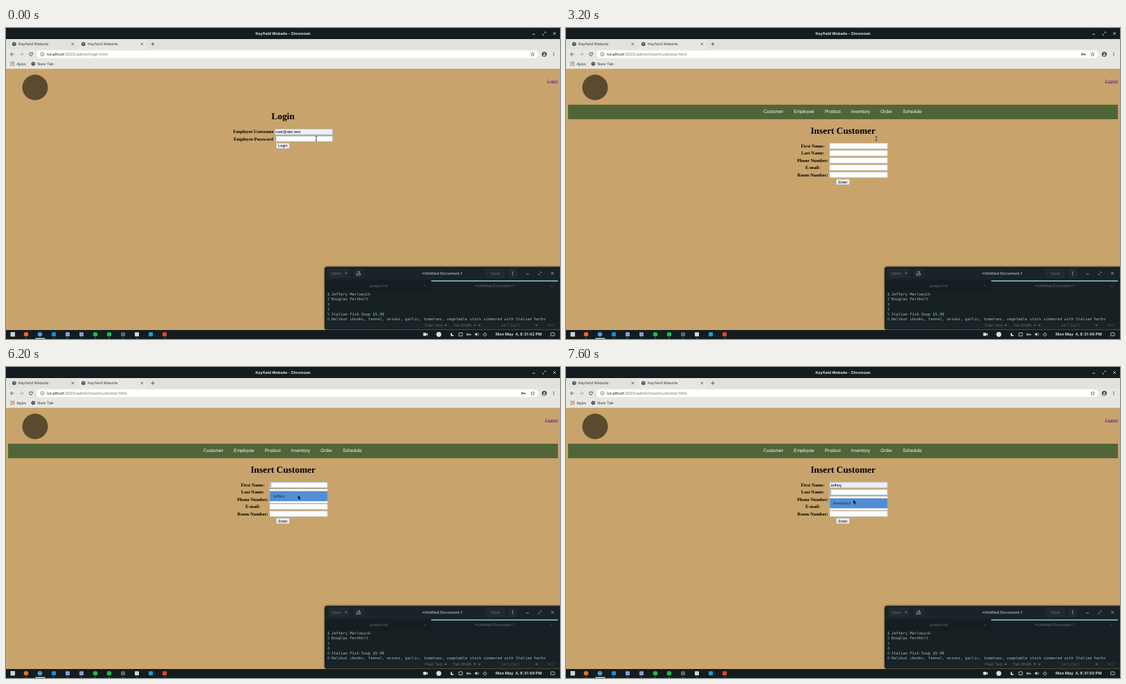
An HTML page with a canvas that plays this animation: 800x450 px, repeating every 8000 ms.

```html
<!DOCTYPE html>
<html>
<head>
<meta charset="utf-8">
<style>
html, body { margin: 0; width: 100%; height: 100%; overflow: hidden; background: #141c1f }
canvas { display: block }
</style>
</head>
<body>
<canvas id="stage" width="800" height="450"></canvas>
<script>
const c = document.getElementById('stage').getContext('2d');
c.textRendering = 'geometricPrecision';
const UI = 'Inter, sans-serif', SERIF = '"Liberation Serif", serif';
const SANS = '"Liberation Sans", sans-serif', MONO = '"DejaVu Sans Mono", monospace';
const TAN = '#c8a46c', DARK = '#141c1f', INK = '#3c4043', DIM = '#5f7378', TRAY = '#d5dddf';
const STRIP = '#e2e2dd', TOOLBAR = '#e7e7e2';
const FIRST = 'Jeffery', LAST = 'Marlowick', SITE = 'Keyfield Website';

function rect(x, y, w, h, color, radius = 0) {
  c.fillStyle = color;
  c.beginPath();
  c.roundRect(x, y, w, h, radius);
  c.fill();
}
function frame(x, y, w, h, color, width = .8, radius = 0) {
  c.strokeStyle = color;
  c.lineWidth = width;
  c.beginPath();
  c.roundRect(x, y, w, h, radius);
  c.stroke();
}
function disc(x, y, r, color) {
  c.fillStyle = color;
  c.beginPath();
  c.arc(x, y, r, 0, 7);
  c.fill();
}
function ring(x, y, r, color, width = .8, from = 0, to = 7) {
  c.strokeStyle = color;
  c.lineWidth = width;
  c.beginPath();
  c.arc(x, y, r, from, to);
  c.stroke();
}
function path(d, color, x = 0, y = 0, width = .8, fill = false) {
  const p = new Path2D(d);
  c.save();
  c.translate(x, y);
  c.lineWidth = width;
  c.strokeStyle = c.fillStyle = color;
  fill ? c.fill(p) : c.stroke(p);
  c.restore();
}
function text(s, x, y, size, family, color, align = 'left', style = '') {
  c.font = `${style} ${size}px ${family}`;
  c.textAlign = align;
  c.fillStyle = color;
  c.fillText(s, x, y);
  return c.measureText(s).width;
}
const heading = (s, y) => text(s, 400, y, 13.33, SERIF, '#000', 'center', 'bold');
const label = (s, x, y) => text(s, x, y, 6.67, SERIF, '#000', 'center', 'bold');
const caret = (x, y) => rect(x, y, .6, 6.4, '#222');
const cross = (x, y, color, r = 1.8) => path(`M${-r} ${-r}L${r} ${r}M${r} ${-r}L${-r} ${r}`, color, x, y);
const chevron = (x, y) => path('M-2-1H2L0 1.5Z', DIM, x, y, 1, true);

function windowButtons(x, y, gap, color) {
  path('M-2 1H2', color, x, y);
  path('M.3-2H2V-.3M-2 .3V2H-.3', color, x + gap, y);
  cross(x + 2 * gap, y, color);
}
function dots(x, y, color) {
  for (const d of [-2, 0, 2]) disc(x, y + d, .65, color);
}
function globe(x, y) {
  disc(x, y, 2.8, INK);
  path('M-2-1Q0-1 0 .5T1 2M.5-2Q0-.5 2 0', '#cfd2d5', x, y, .7);
}
function keyIcon(x, y, color) {
  ring(x - 1.4, y, 1.3, color, 1);
  path('M0 0H3V1.4M1.7 0V1.2', color, x, y, 1);
}
function link(s, style = '') {
  const w = text(s, 797, 78.7, 6.67, SERIF, '#551a8b', 'right', style);
  rect(797 - w, 79.5, w, .5, '#551a8b');
}
function field(x, y, { value = '', filled = false, focus = false } = {}) {
  rect(x, y, 84, 8.7, filled ? '#e8f0fe' : '#fff');
  frame(x + .3, y + .3, 83.4, 8.1, focus ? '#86a5cb' : '#a9a49c', focus ? .8 : .6);
  text(value, x + 1.3, y + 6.4, 5.55, SANS, '#000');
}
function button(s, y) {
  rect(390, y, 19.6, 8.4, '#efefef', .8);
  frame(390.2, y + .2, 19.2, 8, '#8a8a8a', .5, .8);
  text(s, 399.8, y + 6.1, 5.55, SANS, '#000', 'center');
}
function suggestion(y, name, hover) {
  rect(380.6, y, 84, 20.5, '#fff');
  if (hover) rect(380.6, y + 3, 84, 14.6, '#528ed6');
  text(name, 385.6, y + 11.9, 5.8, SANS, '#26323e');
  frame(380.6, y, 84, 20.5, '#a9a49c', .5);
}

function browser(url, hasKey) {
  rect(0, 0, 800, 16, DARK);
  text(SITE + ' - Chromium', 400, 10, 5.55, UI, '#dce4e6', 'center', 'bold');
  windowButtons(762, 8, 15, TRAY);
  rect(0, 16, 800, 15, STRIP);
  rect(103, 17.5, 100, 14, TOOLBAR, [3, 3, 0, 0]);
  for (const x of [0, 100]) {
    globe(11.8 + x, 23.3);
    text(SITE, 18 + x, 25.3, 5.5, UI, INK);
    cross(96.3 + x, 23.3, INK, 1.6);
  }
  path('M-2.6 0H2.6M0-2.6V2.6', INK, 212, 23.3);
  rect(0, 31, 800, 28, TOOLBAR);
  rect(44, 32.5, 725, 11, '#fff', 5.5);
  path('M2.7 0H-2.4M0-2.6L-2.6 0L0 2.6', INK, 9, 38);
  path('M-2.7 0H2.4M0-2.6L2.6 0L0 2.6', '#9fa2a4', 22.5, 38);
  ring(36, 38, 2.3, INK, .9, .3, 5.4);
  path('M2.8-3V-.5H.3Z', INK, 36, 38, 1, true);
  ring(52.5, 38, 2.5, INK, .6);
  rect(52.2, 37.6, .6, 1.9, INK);
  rect(52.2, 36.4, .6, .7, INK);
  const w = text('localhost:', 59, 40, 5.75, UI, '#202124');
  text('3003/admin/' + url, 59 + w, 40, 5.75, UI, '#70757a');
  if (hasKey) keyIcon(747, 38, INK);
  path('M0-2.8L.8-.9L2.8-.8L1.2 .6L1.8 2.6L0 1.5L-1.8 2.6L-1.2 .6L-2.8-.8L-.8-.9Z', INK, 760.5, 38, .6);
  disc(777.3, 38, 3.5, INK);
  disc(777.3, 37, 1.1, '#fff');
  rect(775.3, 38.8, 4, 1.4, '#fff', .7);
  dots(791, 38, INK);
  for (let i = 0; i < 9; i++)
    rect(6.3 + i % 3 * 2.2, 49 + Math.floor(i / 3) * 2.2, 1.4, 1.4, ['#db4437', '#4285f4', '#0f9d58', '#f4b400'][i % 4]);
  text('Apps', 15.2, 53.8, 5.65, UI, INK);
  globe(39.3, 51.7);
  text('New Tab', 45.3, 53.8, 5.65, UI, INK);
  rect(0, 59, 800, 379, TAN);
  disc(42, 86, 18.5, '#5a4a2f');
}

function loginPage(t) {
  const typed = [600, 1200, 1600, 1600, 2000, 2000, 2200, 2200].filter(k => t >= k).length;
  link('Login');
  heading('Login', 132.3);
  label('Employee Username', 357.3, 152.3);
  label('Employee Password', 357.3, 162.6);
  field(388, 145.9, { value: 'user@abc.test', filled: true });
  field(388, 156, { focus: true });
  for (let i = 0; i < typed; i++) disc(390.3 + i * 1.95, 160.3, .8, '#111');
  if (t < 200 || t >= 600) caret(389.2 + typed * 1.95, 157.1);
  button('Login', 166.3);
}

function customerPage(t) {
  link('Logout', 'italic');
  rect(3, 111, 794, 21, '#506538');
  let x = 285;
  for (const s of ['Customer', 'Employee', 'Product', 'Inventory', 'Order', 'Schedule'])
    x += text(s, x, 122.9, 6.67, SANS, '#fff') + 15.1;
  heading('Insert Customer', 153);
  const chosen = t >= 6400, second = t >= 7200;
  ['First Name:', 'Last Name:', 'Phone Number:', 'E-mail:', 'Room Number:'].forEach((s, i) => {
    const y = 166.4 + i * 10.42;
    label(s, 356.4, y + 6.5);
    field(380.5, y, {
      value: i == 0 && chosen ? FIRST : '',
      filled: i == 0 && chosen,
      focus: i == 0 ? t >= 6000 && !second : i == 1 && second
    });
  });
  button('Enter', 218.5);
  if (t >= 6000 && !chosen) {
    caret(381.8, 167.4);
    suggestion(176.6, FIRST, t >= 6200);
  }
  if (second) caret(381.8, 177.9);
  if (t >= 7400) suggestion(187, LAST, t >= 7600);
}

function editor() {
  c.save();
  c.shadowColor = 'rgba(0, 0, 0, .6)';
  c.shadowBlur = 3;
  rect(460, 345.6, 345, 91, '#1a2327', [4, 4, 0, 3]);
  c.restore();
  for (const [x, w] of [[466, 30], [502, 14.5], [692, 29], [725, 13]]) rect(x, 348, w, 14, '#202b2f', 2);
  text('Open', 470, 357, 5.55, UI, DIM);
  chevron(491, 355);
  path('M-2.5 2.5V0H2.5V2.5ZM-1.5-2.5H1.5V0', '#9db0b4', 509, 355);
  text('*Untitled Document 1', 629.5, 357, 5.55, UI, '#8fa6ab', 'center', 'bold');
  text('Save', 706.5, 357, 5.55, UI, DIM, 'center');
  dots(731.5, 355, '#a9bbbf');
  windowButtons(753, 355, 18, '#9db0b4');
  rect(460, 364.5, 340, 16.5, '#172024');
  rect(462, 365, 152, 16, '#151d20');
  rect(614, 365.2, 183, 1.6, '#8ccfd3');
  text('project.txt', 538.5, 375.2, 5.55, UI, DIM, 'center');
  text('*Untitled Document 1', 705.5, 375.2, 5.55, UI, DIM, 'center');
  cross(605.5, 373.3, '#3d4c51', 1.4);
  cross(788, 373.3, '#3d4c51', 1.4);
  rect(460, 381, 340, 44.5, '#172023');
  [FIRST + ' ' + LAST, 'Douglas Fernholt', '', '', 'Italian Fish Soup $5.99',
    'Halibut chunks, fennel, onions, garlic, tomatoes, vegetable stock simmered with Italian herbs'
  ].forEach((s, i) => {
    const y = 387.3 + i * 7.1;
    text(i + 1, 467.3, y, 5.54, MONO, i ? '#83a0a4' : '#c5d5d7', 'right');
    text(s, 469.8, y, 5.54, MONO, '#9fbcbf');
  });
  text('Plain Text', 605, 432.2, 5.55, UI, DIM);
  text('Tab Width: 8', 645.5, 432.2, 5.55, UI, DIM);
  text('Ln 1, Col 1', 715.5, 432.2, 5.55, UI, DIM);
  text('INS', 782, 432.2, 5.55, UI, '#43545a');
  for (const x of [635, 683.5, 766]) chevron(x, 430.3);
}

function taskbar(t) {
  rect(0, 437, 800, 13, DARK);
  rect(42.5, 448.6, 14, 1.4, '#c3d8e0');
  rect(6.5, 440, 6.5, 6.5, '#c9d6d8');
  ['#e8692c', '#5b8fd8', '#1f8ad2', '#7f9fd6', '#8a9bd0', '#1db954', '#1db954', '#4d6a78', '#d5d8d6', '#1b9ad6', '#e0452c']
    .forEach((color, i) => {
      const x = 29 + i * 20;
      if ([0, 1, 5, 6].includes(i)) disc(x, 443.3, 3.3, color);
      else rect(x - 3, 440.3, 6, 6, color, .8);
      if (i != 1 && i != 9) rect(x - .7, 448.8, 1.4, 1, '#82979b');
    });
  rect(602.5, 441, 4.5, 4.6, TRAY, .6);
  path('M0 0L2.5-2V2Z', TRAY, 606.5, 443.3, 1, true);
  disc(625, 443.3, 3.6, TRAY);
  disc(644.5, 443.3, 2.6, TRAY);
  disc(646, 442.4, 2.2, DARK);
  frame(654, 441, 5, 4.6, TRAY);
  keyIcon(668, 443.3, TRAY);
  path('M-3-1H-1.5L.3-2.7V2.7L-1.5 1H-3Z', TRAY, 680, 443.3, 1, true);
  ring(680, 443.3, 2.5, TRAY, .7, -.9, .9);
  ring(691.5, 443.5, 2.2, TRAY, .8, -.9, 4.04);
  rect(691.1, 440.4, .8, 2.6, TRAY);
  const seconds = 43 + Math.floor((t - 200) / 1000);
  text(`Mon May  4, 8:31:${seconds} PM`, 707, 445.3, 5.75, UI, '#e3eaec', 'left', '600');
  frame(786.7, 441, 5.4, 4.4, TRAY, .8, .5);
}

const route = [
  [0, 448, 160], [4000, 448, 160], [5200, 459, 235], [5400, 440, 160], [5600, 425.5, 170],
  [5800, 425.5, 170], [6200, 421.7, 185.5], [6400, 421.7, 185.5], [7000, 421, 182],
  [7200, 421, 182], [7600, 415, 192], [8000, 415, 192]
];
function pointer(t) {
  const i = route.findIndex(p => p[0] > t);
  const [t0, x0, y0] = route[i - 1], [t1, x1, y1] = route[i];
  const k = (t - t0) / (t1 - t0), x = x0 + (x1 - x0) * k, y = y0 + (y1 - y0) * k;
  if (t == 6200 || t >= 7600) path('M0 0V6L1.4 4.7L2.3 6.8L3.2 6.4L2.3 4.4H4.2Z', '#111', x, y, 1, true);
  else path('M-1.4-3H1.4M0-3V3M-1.4 3H1.4', '#33302a', x, y, .8);
}

function draw(now) {
  const t = Math.floor(now % 8000 / 200) * 200;
  browser(t < 3000 ? 'login.html' : 'insertcustomer.html', t >= 600 && t < 6600);
  if (t < 3200) loginPage(t);
  else customerPage(t);
  // screen tearing while the next page loads
  if (t == 3000) for (let i = 0; i < 9; i++) rect(487 + i * 35, 15.5, 313 - i * 35, 2.2 + i * .75, '#050708');
  editor();
  taskbar(t);
  pointer(t);
  requestAnimationFrame(draw);
}
requestAnimationFrame(draw);
</script>
</body>
</html>
```
